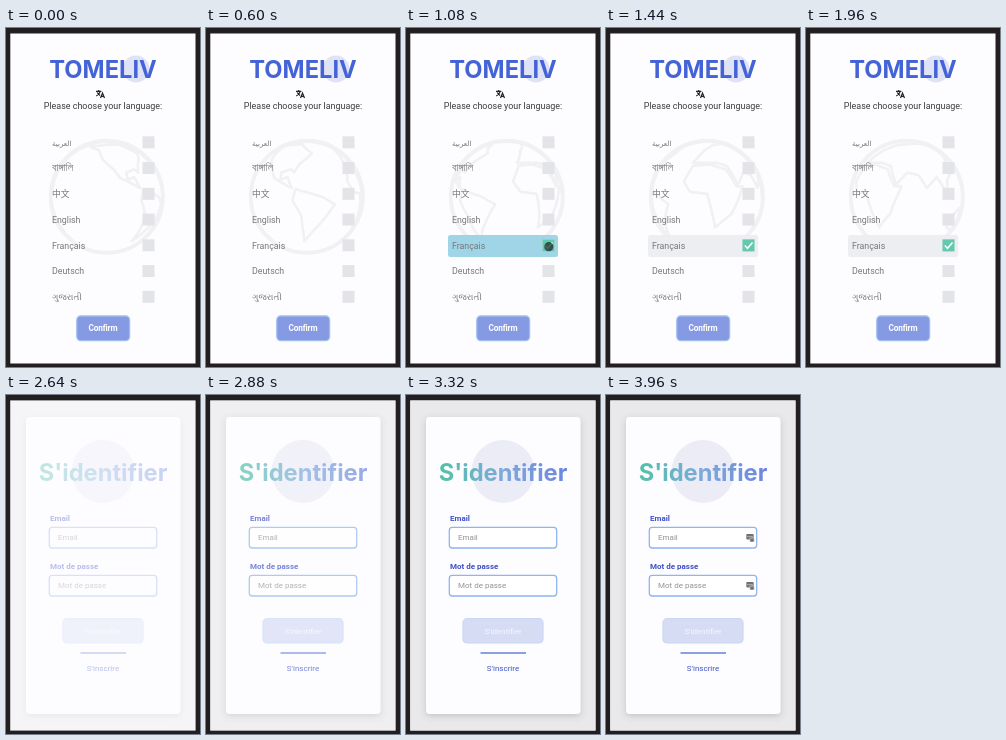
Recreate the animation shown at these times as an HTML page. Size 194x339 px, loop 4000 ms.

```html
<!DOCTYPE html>
<html lang="fr">
<head>
<meta charset="utf-8">
<title>Language choice and sign-in</title>
<style>
  html, body { margin: 0; width: 100%; height: 100%; overflow: hidden; background: #231f20; }
  svg { display: block; width: 100vw; height: 100vh; }
  text { font-family: Roboto, "Noto Sans", "Noto Sans CJK SC", sans-serif; }
  .title { font-family: Inter, sans-serif; font-weight: 700; }
  .mid { text-anchor: middle; }
  .bold { font-weight: 700; }
  .row { font-size: 8.8px; fill: #77777b; }
  .row:lang(ar) { font-size: 7.1px; }
  .row:lang(bn) { font-size: 10.8px; }
  .small { font-size: 8px; }
</style>
</head>
<body>
<svg viewBox="0 0 194 339" preserveAspectRatio="none">
  <defs>
    <linearGradient id="ink">
      <stop offset="0" stop-color="#51c2a9"/>
      <stop offset=".5" stop-color="#7ea9da"/>
      <stop offset="1" stop-color="#6c85df"/>
    </linearGradient>
    <filter id="shade" x="-10%" y="-10%" width="120%" height="120%">
      <feDropShadow dx="0" dy="2" stdDeviation="3" flood-color="#555" flood-opacity=".25"/>
    </filter>
  </defs>
  <rect width="194" height="339" fill="#231f20"/>
  <rect x="4.3" y="5.5" width="185.2" height="330" fill="#fdfdff"/>

  <g id="choose">
    <circle cx="130" cy="41" r="13.5" fill="#dfe3f5"/>
    <text class="title mid" x="97" y="49.5" font-size="23.7" font-weight="800" fill="#4463d6">TOMELIV</text>
    <g fill="none" stroke="#222" stroke-width="1.2">
      <path d="M90 63.3h5.4M92.7 62v1.3M94.3 63.3q-.8 2.8-4 4.7M91.3 64.5q1 2 2.8 3"/>
      <path d="M94.5 70l2-5 2 5M95.2 68.4h2.6"/>
    </g>
    <text class="mid" x="97" y="81" font-size="8.95" fill="#3c3c40">Please choose your language:</text>
    <g fill="none" stroke="#f1f1f4" stroke-linejoin="round">
      <circle cx="100.8" cy="168.7" r="56" stroke-width="4"/>
      <path id="land" stroke-width="2.6"/>
    </g>
    <rect id="mark" x="42" y="207" width="110" height="22" rx="2.5"/>
    <g id="rows"></g>
    <g id="tick">
      <rect x="136.5" y="211.4" width="12" height="12" fill="#62c9ae"/>
      <path d="M138.7 217.5l2.8 2.8 5-5.8" fill="none" stroke="#fff" stroke-width="1.5"/>
    </g>
    <rect id="confirm" x="70.8" y="288" width="52.8" height="24.6" rx="4" stroke-width="1.3"/>
    <text class="mid bold" x="97" y="303.3" font-size="8.3" letter-spacing="-.2" fill="#fff">Confirm</text>
    <circle id="touch" r="4.6" fill="#1c2a2c"/>
  </g>

  <g id="login">
    <rect x="4.3" y="5.5" width="185.2" height="330" fill="#e9e8ea"/>
    <rect x="20" y="22" width="154.5" height="297" rx="4" fill="#fdfdff" filter="url(#shade)"/>
    <circle cx="97" cy="76.5" r="31.5" fill="#ececf7"/>
    <text class="title mid" x="97" y="86" font-size="23.7" fill="url(#ink)">S'identifier</text>
    <g id="fields"></g>
    <rect x="57" y="223.7" width="80" height="24.3" rx="4" fill="#d6dcf4" stroke="#cbd8f5" stroke-width="1.2"/>
    <text class="small mid" x="97" y="238.7" fill="#f5f7fd">S'identifier</text>
    <path d="M74.5 258h45.5" stroke="#6582dc" stroke-width="1.3"/>
    <text class="small mid" x="97" y="276" fill="#4054c6">S'inscrire</text>
  </g>
</svg>
<script>
const LOOP = 4000, TAP = 1000, CONFIRM = 2160, SWITCH = 2440, FILL = 3520;
const $ = id => document.getElementById(id);
const clamp = v => Math.max(0, Math.min(1, v));
const ramp = (t, a, b) => clamp((t - a) / (b - a));
const within = (t, a, b) => t >= a && t < b;
const show = (id, on) => $(id).style.display = on ? '' : 'none';
const mix = (a, b, k) => `rgb(${a.map((v, i) => Math.round(v + (b[i] - v) * k))})`;

const languages = {
  ar: 'العربية', bn: 'বাঙ্গালি', zh: '中文', en: 'English',
  fr: 'Français', de: 'Deutsch', gu: 'ગુજરાતી'
};
$('rows').innerHTML = Object.entries(languages).map(([code, name], i) => {
  const y = 114.3 + i * 25.75;
  return `<text class="row" lang="${code}" x="46" y="${y + 3.2}">${name}</text>
    <rect x="136.5" y="${y - 6}" width="12" height="12" fill="#e3e4e8"/>`;
}).join('');

$('fields').innerHTML = [['Email', 132], ['Mot de passe', 180]].map(([name, y]) =>
  `<text class="small bold" x="44" y="${y - 6}" fill="#3f4fca">${name}</text>
  <rect x="43.3" y="${y + .4}" width="107.4" height="20.6" rx="3" fill="#fff" stroke="#8fb4ee" stroke-width="1.3"/>
  <text class="small" x="52" y="${y + 13.4}" fill="#929298">${name}</text>
  <g class="key" fill="#727276">
    <rect x="140.3" y="${y + 7}" width="7.4" height="5.4" rx=".8"/>
    <path d="M141.5 ${y + 9.6}h5" stroke="#fff" stroke-width=".9" stroke-dasharray=".9 1.1"/>
    <rect x="143.8" y="${y + 11}" width="4.4" height="4" rx=".7" stroke="#fff" stroke-width=".5"/>
  </g>`).join('');
const keys = document.querySelectorAll('.key');

// Outlines as longitude, latitude pairs
const lands = [
  [-165,65, -125,70, -80,72, -57,52, -76,36, -81,26, -85,30, -97,26, -96,18, -88,21, -82,9, -105,20, -112,30, -125,42, -135,58],
  [-78,8, -50,0, -35,-8, -48,-27, -70,-54, -72,-20, -81,-4],
  [-16,16, -8,34, 12,36, 33,30, 43,11, 51,11, 38,-18, 20,-34, 10,3, -8,5],
  [-9,38, 5,58, 28,70, 95,75, 175,66, 140,54, 120,38, 121,28, 107,18, 103,3, 92,21, 78,9, 70,23, 57,26, 45,13, 36,34, 22,38],
  [114,-23, 132,-12, 143,-12, 153,-28, 140,-38, 116,-34]
];
const RAD = Math.PI / 180;

function outline(land, turn) {
  const steps = [], n = land.length / 2;
  let front = false;
  for (let i = 0; i < n; i++) {
    const j = (i + 1) % n;
    for (let s = 0; s < 4; s++) {
      const at = k => land[2 * i + k] + (land[2 * j + k] - land[2 * i + k]) * s / 4;
      const lon = (at(0) - turn) * RAD, lat = at(1) * RAD;
      let x = Math.cos(lat) * Math.sin(lon), y = Math.sin(lat);
      if (Math.cos(lon) > 0) front = true;
      else {
        const d = Math.hypot(x, y) || 1;
        x /= d;
        y /= d;
      }
      steps.push((100.8 + 55 * x).toFixed(2) + ' ' + (168.7 - 55 * y).toFixed(2));
    }
  }
  return front ? 'M' + steps.join('L') + 'Z' : '';
}

function draw(t) {
  const signing = t >= SWITCH;
  show('choose', !signing);
  show('login', signing);
  if (signing) {
    $('login').style.opacity = 1 - (1 - ramp(t, SWITCH, 3280)) ** 1.6;
    keys.forEach(k => k.style.opacity = t >= FILL ? 1 : 0);
    return;
  }
  $('land').setAttribute('d', lands.map(l => outline(l, t * .09 - 120)).join(''));
  const tapping = within(t, TAP, 1240);
  show('mark', t >= TAP);
  $('mark').setAttribute('fill', tapping ? '#a0d5e8' : '#eceef1');
  show('tick', t >= TAP + 40);
  const press = ramp(t, CONFIRM, CONFIRM + 100);
  $('confirm').setAttribute('fill', mix([134, 153, 227], [36, 70, 182], press));
  $('confirm').setAttribute('stroke', mix([158, 190, 240], [112, 155, 236], press));
  show('touch', tapping || t >= CONFIRM);
  $('touch').setAttribute('cx', tapping ? 142.8 : 100);
  $('touch').setAttribute('cy', tapping ? 218.7 : 299);
  $('touch').setAttribute('opacity', tapping ? .75 : .65);
}

function tick() {
  draw(performance.now() % LOOP);
  requestAnimationFrame(tick);
}
tick();
</script>
</body>
</html>
```
